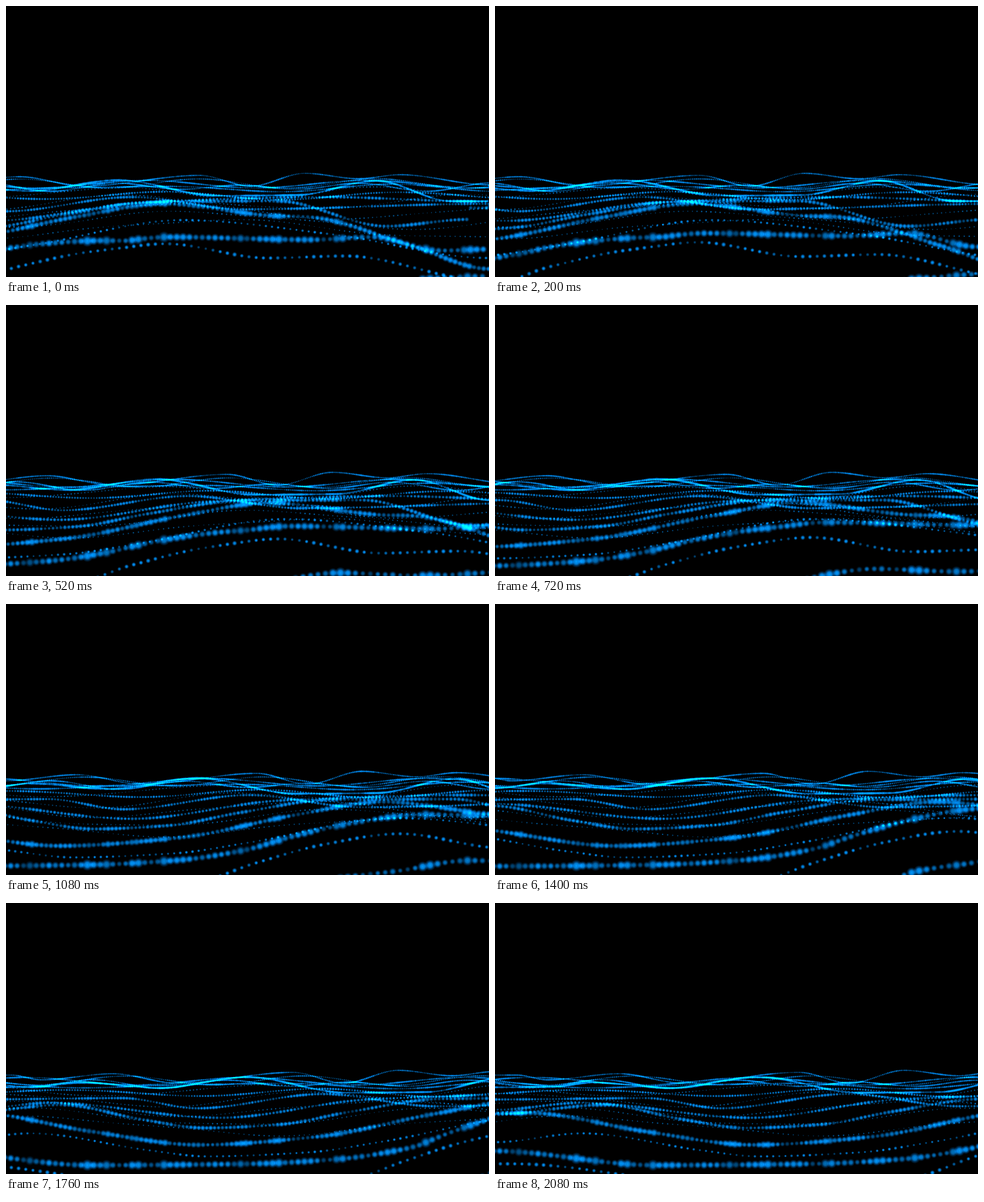
Write an HTML page with a canvas that moves like this. It is 711 by 400 pixels and loops after 2.12 s.

```html
<!DOCTYPE html>
<html>
<head>
<meta charset="utf-8">
<style>
html, body { margin: 0; width: 100%; height: 100%; overflow: hidden; background: #000; }
canvas { display: block; }
</style>
</head>
<body>
<canvas id="stage" width="711" height="400"></canvas>
<script>
const W = 711, H = 400, LOOP = 2120, STEP = 40;
const ctx = document.getElementById('stage').getContext('2d');
const strands = [];

// Soft round dot, scaled for every particle
const dot = document.createElement('canvas');
dot.width = dot.height = 32;
const dc = dot.getContext('2d');
const glow = dc.createRadialGradient(16, 16, 0, 16, 16, 16);
glow.addColorStop(0, 'rgba(0,155,255,1)');
glow.addColorStop(.4, 'rgba(0,145,250,.85)');
glow.addColorStop(.7, 'rgba(0,130,235,.35)');
glow.addColorStop(1, 'rgba(0,120,225,0)');
dc.fillStyle = glow;
dc.fillRect(0, 0, 32, 32);

const hash = n => { const s = Math.sin(n * 127.1) * 43758.5453; return s - Math.floor(s); };

// Columns where the near particles are out of focus
const blurs = [38, 120, 148, 190, 232, 348, 400, 490, 620, 680];
const blurAt = x => blurs.reduce((sum, c) => sum + Math.exp(-(((x - c) / 8) ** 2)), 0);

// Smooth curve through key points [u, y], level at crests and troughs
function through(...p) {
  const rate = i => (p[i + 1][1] - p[i][1]) / (p[i + 1][0] - p[i][0]);
  const slope = p.map((_, i) => {
    if (i === 0 || i === p.length - 1) return 0;
    const a = rate(i - 1), b = rate(i);
    return a * b > 0 ? 2 * a * b / (a + b) : 0;
  });
  return u => {
    const i = Math.max(0, Math.min(p.length - 2, p.findIndex(q => q[0] > u) - 1));
    const w = p[i + 1][0] - p[i][0];
    const f = Math.max(0, Math.min(1, (u - p[i][0]) / w)), g = 1 - f;
    return p[i][1] * g * g * (1 + 2 * f) + p[i + 1][1] * f * f * (1 + 2 * g)
      + w * f * g * (slope[i] * g - slope[i + 1] * f);
  };
}

const wave = (base, amp, length, crest, ripple = 2) => u =>
  base - amp * Math.cos((u - crest) * 2 * Math.PI / length) + ripple * Math.sin(u / 43 + crest);

// Particles keep their x while the curve runs right; its front rises by lift px/s
function strand(speed, gap, radius, alpha, blur, curve, lift = 0) {
  const seed = strands.length + 1, dots = [];
  for (let x = hash(seed) * gap - gap, i = 0; x < W + gap; x += gap, i++) {
    const n = .5 + .5 * Math.sin(x * .071 + seed * 2.1) * Math.sin(x * .029 + seed * 5);
    const b = blur * blurAt(x);
    dots.push({
      x,
      r: radius * (.72 + .4 * n + .25 * hash(i + seed * 91)) + b,
      a: Math.min(1, alpha * (.35 + .65 * n + .3 * hash(i * 3 + seed * 17)) + b * .04)
    });
  }
  strands.push({ speed, curve, lift, dots });
}

// Far cluster
strand(78, 2.5, 1.6, 1, 0, through([-130, 254], [-85, 261], [20, 252], [115, 266],
  [285, 250], [360, 266], [440, 247], [520, 255], [580, 249], [711, 264]));
strand(84, 2.6, 1.7, 1, 0, wave(263, 5.5, 325, 205, 0));
strand(92, 2.6, 1.7, 1, 0, wave(267, 4.5, 185, 157));
strand(88, 2.8, 1.5, .8, 0, wave(262, 5, 260, 30));
strand(98, 2.8, 1.8, 1, 0, wave(269, 4, 390, 180));
strand(108, 2.6, 2.2, 1.2, 0, through([-150, 272], [-80, 265], [35, 273], [165, 257],
  [310, 280], [430, 279], [545, 258], [655, 288], [711, 288]));
strand(130, 4, 2, 1, 0, wave(280, 5, 370, 225, 1));

// Faint rows between the main ones
for (let i = 0; i < 5; i++) {
  strand(120 + 32 * i, 5 + .6 * i, 1.3, .6, 0, wave(277 + 13 * i, 9 + i, 410 + 75 * i, 150 + 40 * i));
}

// Middle rows
strand(160, 4.4, 2.5, 1, .1, through([-330, 290], [-110, 288], [0, 303], [185, 282],
  [350, 300], [711, 292]));
strand(190, 5.2, 2.7, 1, .2, through([-390, 305], [-270, 295], [-20, 317], [200, 290],
  [470, 282], [711, 289]));
strand(240, 5.8, 3.3, 1, .4, through([-500, 312], [-340, 298], [-225, 319], [-130, 332],
  [-20, 327], [85, 308], [220, 289], [400, 288], [560, 325], [680, 315]));

// Near rows
strand(300, 7, 4.3, 1, 1.4, through([-574, 310], [-404, 337], [-244, 357], [-70, 345],
  [104, 311], [230, 292], [400, 310], [440, 311], [600, 355], [711, 388]));
strand(290, 9, 2.2, .9, 0, through([-603, 353], [-475, 340], [-300, 365], [-215, 374],
  [-65, 368], [45, 352], [260, 316], [480, 337], [711, 372]));
strand(320, 10.6, 3.1, 1, .2, through([-640, 385], [-300, 420], [-60, 408], [20, 383],
  [125, 355], [235, 340], [385, 361], [500, 358], [711, 395]), 11);
strand(345, 9.4, 5.3, 1, 2.7, through([-720, 366], [-483, 387], [-250, 385], [-118, 378],
  [-25, 364], [52, 343], [150, 323], [240, 313], [450, 317], [540, 313], [640, 333], [711, 331]), 28);
strand(345, 11, 5.2, .9, 2.6, through([0, 440], [137, 404], [200, 397], [310, 381],
  [430, 385], [711, 369]), 30);

function draw(t) {
  ctx.globalCompositeOperation = 'source-over';
  ctx.globalAlpha = 1;
  ctx.fillStyle = '#000';
  ctx.fillRect(0, 0, W, H);
  ctx.globalCompositeOperation = 'lighter';
  for (const { speed, curve, lift, dots } of strands) {
    for (const { x, r, a } of dots) {
      const u = x - speed * t;
      const y = curve(u) - lift * (t - 1) * Math.max(0, Math.min(1, u / 180));
      ctx.globalAlpha = a;
      ctx.drawImage(dot, x - r, y - r, 2 * r, 2 * r);
    }
  }
}

function tick() {
  const ms = performance.now() % LOOP;
  draw(Math.floor(ms / STEP) * STEP / 1000);
  requestAnimationFrame(tick);
}
tick();
</script>
</body>
</html>
```
